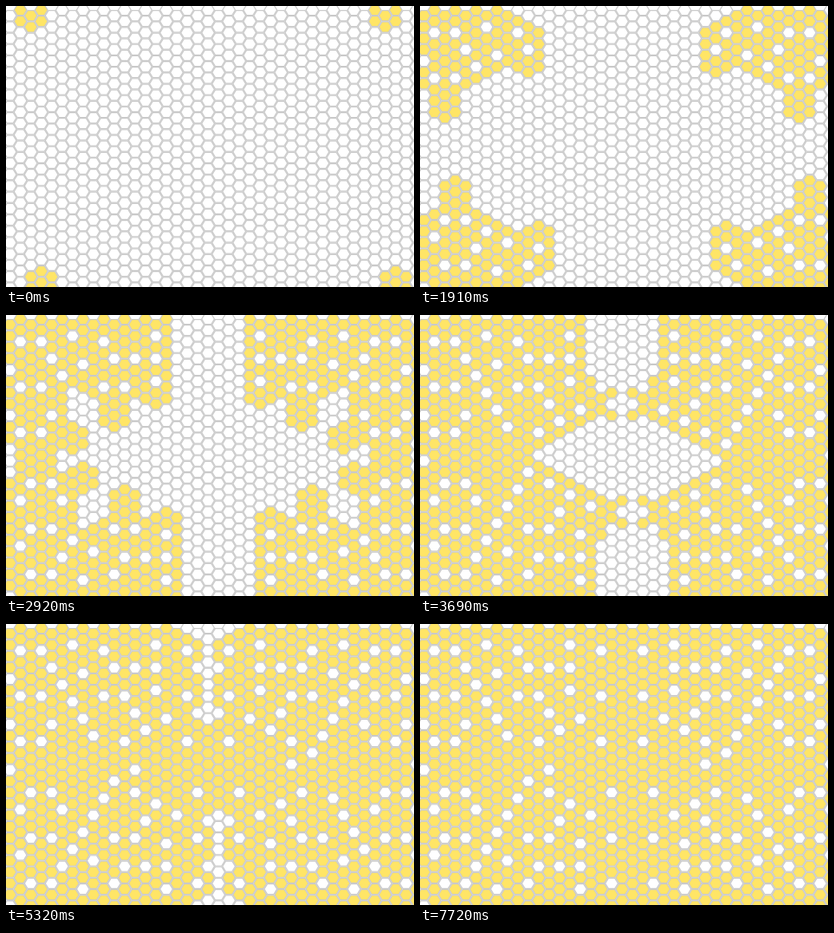
Write an HTML page with a canvas that moves like this. It is 510 by 352 pixels and loops after 8340 ms.

```html
<!DOCTYPE html>
<html lang="en">
<head>
<meta charset="utf-8">
<title>Honeycomb growth</title>
<style>
  html, body { margin: 0; width: 100%; height: 100%; overflow: hidden; background: #fff; }
  canvas { display: block; }
</style>
</head>
<body>
<canvas id="stage" width="510" height="352"></canvas>
<script>
const ctx = document.getElementById('stage').getContext('2d');
const COLS = 40, ROWS = 25, LOOP = 8340, STEPS = 33;
const DX = 13.03, DY = 14.22;
const EMPTY = '#fff', FILLED = '#ffe566', BORDER = '#c9c9c9';

// Even columns sit half a cell lower than odd ones.
function neighbours(c, r) {
  const up = c % 2 ? r - 1 : r;
  return [[c, r - 1], [c, r + 1], [c - 1, up], [c - 1, up + 1], [c + 1, up], [c + 1, up + 1]]
    .filter(([x, y]) => x >= 0 && x < COLS && y >= 0 && y < ROWS);
}

function hexagon(c, r, scale) {
  const x = 5 + c * DX, y = 5 + (r + (c % 2 ? 0 : 0.5)) * DY;
  const w = DX * 2 / 3 * scale, h = DY / 2 * scale;
  const path = new Path2D();
  for (const [px, py] of [[-w, 0], [-w / 2, -h], [w / 2, -h], [w, 0], [w / 2, h], [-w / 2, h]])
    path.lineTo(x + px, y + py);
  path.closePath();
  return path;
}

const cells = [];
for (let c = 0; c < COLS; c++)
  for (let r = 0; r < ROWS; r++)
    cells.push({ c, r, born: Infinity, outer: hexagon(c, r, 1), inner: hexagon(c, r, 0.83) });
const cellAt = ([c, r]) => cells[c * ROWS + r];
for (const cell of cells) cell.near = neighbours(cell.c, cell.r).map(cellAt);

// Two seeds on the top row, and the same two turned by half a turn.
for (const c of [2, 36]) {
  cellAt([c, 0]).born = 0;
  cellAt([COLS - 1 - c, ROWS - 1]).born = 0;
}

// A cell fills when an odd number of its neighbours are already filled.
for (let step = 1; step <= STEPS; step++)
  for (const cell of cells)
    if (cell.born > step && cell.near.filter(n => n.born < step).length % 2) cell.born = step;

// Steady beat, a little quicker near the end, with a short rest before some steps.
function stepAt(t) {
  const rests = [7, 11, 15, 24, 28, 31];
  let step = 1;
  for (let next = 210; next <= t && step < STEPS; ) {
    step++;
    next += (step < 24 ? 230 : 212) + (rests.includes(step + 1) ? 86 : 0);
  }
  return step;
}

function draw(step) {
  ctx.fillStyle = EMPTY;
  ctx.fillRect(0, 0, 510, 352);
  ctx.fillStyle = BORDER;
  for (const { outer } of cells) ctx.fill(outer);
  for (const { inner, born } of cells) {
    ctx.fillStyle = born <= step ? FILLED : EMPTY;
    ctx.fill(inner);
  }
}

let shown = 0;
function tick() {
  const step = stepAt(performance.now() % LOOP);
  if (step !== shown) draw(shown = step);
  requestAnimationFrame(tick);
}
tick();
</script>
</body>
</html>
```
